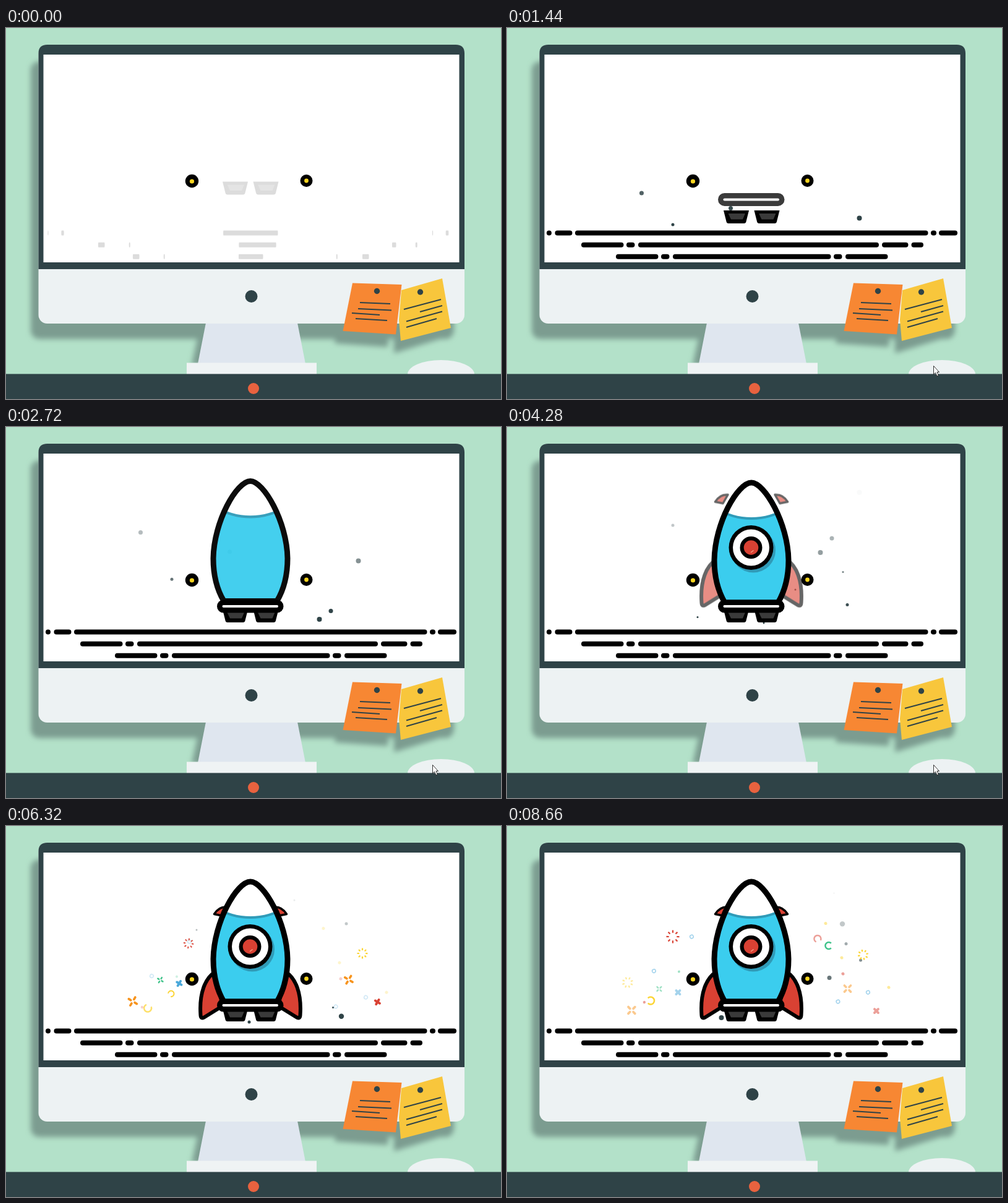
An HTML page that plays this animation: 800x600 px, repeating every 8680 ms.

```html
<!DOCTYPE html>
<html lang="en">
<head>
<meta charset="utf-8">
<title>Rocket assembly</title>
<style>
html, body { margin: 0; width: 100%; height: 100%; overflow: hidden; background: #b3e1c9; }
svg { display: block; width: 800px; height: 600px; }
</style>
</head>
<body>
<svg viewBox="0 0 800 600">
  <defs>
    <filter id="soft" x="-10%" y="-10%" width="120%" height="120%"><feGaussianBlur stdDeviation="4"/></filter>
    <path id="hull" d="M352 284C339 262 335 240 335 215C336 155 373 90 395 90C416 90 454 155 455 215C455 240 451 262 438 284Z"/>
    <clipPath id="inside"><use href="#hull"/></clipPath>
    <clipPath id="display"><rect x="60.5" y="43" width="672" height="336"/></clipPath>
    <g id="boot">
      <path d="M350 295H391L386.500 313Q386 316 383 316H358Q355 316 354.500 313Z"/>
      <path d="M357.500 300H385L381 309.500H362Z" fill="#3a3a3a"/>
    </g>
    <g id="fin" fill="#d94133" stroke="#000" stroke-linejoin="round">
      <path stroke-width="6" d="M338 236C322 246 312 270 314.500 306Q315 313 321 309L350 291Z"/>
      <path stroke-width="3.500" d="M357 131Q344 130 336.500 142.500L349 145Z"/>
    </g>
  </defs>

  <rect width="800" height="600" fill="#b3e1c9"/>

  <g fill="#7b9c90" filter="url(#soft)">
    <rect x="40" y="54" width="684" height="449" rx="14"/>
    <path d="M312 490L300 545H330V490Z"/>
    <path d="M544 433L624 436L617 516L531 510Z"/>
    <path d="M626 444L692 425L708 501L627 526Z"/>
  </g>
  <path d="M323 477H471L484 543H310Z" fill="#dfe6ef"/>
  <rect x="292" y="541.500" width="210" height="19" fill="#eff3f4"/>
  <rect x="52.500" y="27" width="688.500" height="451" rx="14" fill="#edf2f3"/>
  <path d="M52.500 390V41Q52.500 27 66.500 27H727Q741 27 741 41V390Z" fill="#2f4347"/>
  <rect x="60.500" y="43" width="672" height="336" fill="#fff"/>
  <circle cx="396.500" cy="434" r="10" fill="#2f4347"/>
  <ellipse cx="703" cy="560" rx="54" ry="23" fill="#edf2f3"/>
  <rect y="559.500" width="800" height="41" fill="#2f4347"/>
  <circle cx="400" cy="583" r="9" fill="#e8623f"/>

  <path d="M560 412.500L639.500 415L630 495.500L544.500 490Z" fill="#f78733"/>
  <path d="M639 424L705 405L719 485L638 506L635 472Z" fill="#f8c63c"/>
  <g fill="#2f4347"><circle cx="599.500" cy="425.500" r="4.700"/><circle cx="669.500" cy="427" r="4.700"/></g>
  <path stroke="#2f4347" stroke-width="2" d="M572 444L621 446M569 454L623 456.500M559 461L604 464M565 470L616 473M643 455L703 439M669 459L705 449M647 474.500L705 458.500M647 484L696 470"/>

  <g clip-path="url(#display)">
    <g id="lines"></g>
    <g id="bubbles" fill="#2f4347"></g>
    <g id="confetti"></g>
    <g id="fins">
      <use href="#fin"/><use href="#fin" transform="matrix(-1 0 0 1 790 0)"/>
    </g>
    <g id="boots">
      <use href="#boot"/><use href="#boot" x="49.500"/>
    </g>
    <g id="body">
      <use href="#hull" fill="#fff"/>
      <path clip-path="url(#inside)" d="M330 128Q395 168 460 128V281H330Z" fill="#3bcdee" stroke="none"/>
      <path clip-path="url(#inside)" d="M330 128Q395 168 460 128" fill="none" stroke="#309bb8" stroke-width="4"/>
      <use href="#hull" fill="none" stroke="#000" stroke-width="9"/>
    </g>
    <g id="porthole">
      <circle cx="398" cy="199.500" r="36" fill="#309bb8"/>
      <circle cx="394.500" cy="195" r="36"/>
      <circle cx="394.500" cy="195" r="29.500" fill="#fff"/>
      <circle cx="394.500" cy="195" r="18"/>
      <circle cx="394.500" cy="195" r="11.800" fill="#d94133"/>
      <path d="M394 203L398.500 199.500" stroke="#f2a184" stroke-width="1.500"/>
    </g>
    <g id="belt">
      <rect x="341" y="279.500" width="107.500" height="21" rx="10.500"/>
      <rect x="349.500" y="288" width="90.500" height="4" rx="2" fill="#fff"/>
    </g>
    <circle cx="300.500" cy="247.500" r="10.700"/><circle cx="300.500" cy="248" r="3.600" fill="#ffd61f"/>
    <circle cx="485.500" cy="247" r="10"/><circle cx="485.500" cy="247" r="3.400" fill="#ffd61f"/>
  </g>
  <path id="cursor" d="M689.500 546.500V560L692.500 557.500L695 563L697.300 562L695 556.500H698.500Z" fill="#fff" stroke="#222" stroke-width=".9"/>
</svg>
<script>
const LOOP = 8680;
const $ = id => document.getElementById(id);
const clamp = v => Math.max(0, Math.min(1, v));

function add(parent, tag, attrs) {
  const el = document.createElementNS('http://www.w3.org/2000/svg', tag);
  for (const k in attrs) el.setAttribute(k, attrs[k]);
  return parent.appendChild(el);
}
function place(el, transform, opacity) {
  el.setAttribute('transform', transform);
  el.setAttribute('opacity', opacity);
}

// Ground lines: y, then the ends of each dash
const dashes = [
  [331.5, 64, 72, 77.5, 105.5, 110, 680.5, 685, 694, 698, 728],
  [350.7, 120, 188.5, 193, 206.5, 212, 601, 606, 648.5, 653.5, 673],
  [369.8, 176, 244.5, 249, 262.5, 268, 523.5, 528, 541.5, 547, 615.5]
].flatMap(([y, ...ends]) => [0, 2, 4, 6, 8].map(i => {
  const w = ends[i + 1] - ends[i];
  const el = add($('lines'), 'rect', { x: -w / 2, y: -4, width: w, height: 8, rx: 4 });
  return { el, y, x: ends[i] + w / 2 };
}));

// Rising bubbles: x, radius, start time, speed, slowdown
const bubbles = [
  [217.5, 3.5, 764, 75.4], [361.5, 3.5, 1061, 70], [569.5, 4, 1292, 71], [268, 2.5, 1440, 56],
  [525, 3.5, 2448, 75.3], [506.5, 4, 2619, 69.2], [543, 1.5, 3087, 70], [466, 1.5, 3494, 70],
  [550, 2.5, 3800, 63.5], [308, 1.5, 4127, 68.4], [415, 1.5, 4266, 60], [528.5, 1.5, 6010, 79],
  [542, 4.2, 6195, 82, 7], [393, 2.5, 6306, 70], [548, 2.5, 7066, 80], [571.5, 2.5, 7348, 77],
  [521, 3.5, 7527, 64], [382, 2.5, 7646, 70], [346.5, 4, 8546, 70]
].map(([x, r, start, speed, drag = 0]) =>
  ({ el: add($('bubbles'), 'circle', { r }), x, start, speed, drag }));

const rays = (n, from, to) => Array.from({ length: n }, (_, i) => {
  const c = Math.cos(i * 2 * Math.PI / n), s = Math.sin(i * 2 * Math.PI / n);
  return `M${c * from} ${s * from}L${c * to} ${s * to}`;
}).join('');

const shapes = {
  dot: (s, c) => ['circle', { r: s, fill: c }],
  ring: (s, c) => ['circle', { r: s, fill: 'none', stroke: c, 'stroke-width': 1.6 }],
  arc: (s, c) => ['path', { d: `M${s * .7} ${s * .7}A${s} ${s} 0 1 1 ${s * .7} ${-s * .7}`,
    fill: 'none', stroke: c, 'stroke-width': 2.5 }],
  burst: (s, c) => ['path', { d: rays(8, s * .6, s), stroke: c, 'stroke-width': 2.2 }],
  flower: (s, c) => ['path', { d: rays(4, s * .4, s * .8), stroke: c,
    'stroke-width': s * .4, 'stroke-linecap': 'round' }],
  cross: (s, c) => ['path', { d: rays(4, s * .3, s * .65), stroke: c,
    'stroke-width': s * .6, 'stroke-linecap': 'round' }]
};
const red = '#d94133', yellow = '#fcd535', blue = '#4aa8da', green = '#3fc38a', orange = '#f7941e';

// Confetti by burst times: shape, x, y, size, colour, angle
const confetti = [
  [[4620, 7260], [
    ['ring', 303, 160, 2.8, blue], ['ring', 242, 215.5, 2.8, blue],
    ['ring', 588, 250, 2.8, blue], ['ring', 539.5, 265, 2.8, blue],
    ['dot', 282.5, 216.5, 2, green], ['dot', 226.5, 266, 2.2, red], ['dot', 547.5, 220, 2.5, red],
    ['dot', 519.5, 138.5, 2.5, yellow], ['dot', 545.5, 194, 2.5, yellow], ['dot', 621.5, 242, 2.5, yellow]]],
  [[5570, 7260], [
    ['flower', 250.5, 244.5, 6, green, 65], ['cross', 281, 250, 6.5, blue, 65],
    ['flower', 206, 279, 9.5, orange, 65], ['flower', 555, 244, 9, orange, 65],
    ['cross', 601.5, 280, 6.5, red, 65]]],
  [[7260], [['burst', 199.5, 234, 9, yellow], ['arc', 506.5, 163.5, 5.5, red, 270]]],
  [[5210, 6160, 8260], [['arc', 232, 282.5, 6, yellow, 180]]],
  [[5920, 8060], [['burst', 576, 206, 8.5, yellow]]],
  [[6160, 8260], [['burst', 268, 179, 10.5, red]]],
  [[8260], [['arc', 520, 193.5, 5.5, green]]]
].flatMap(([starts, items]) => starts.flatMap(start =>
  items.map(([kind, x, y, size, color, angle = 0]) =>
    ({ el: add($('confetti'), ...shapes[kind](size, color)), x, y, angle, start }))));

// Parts drop into place while fading in
const parts = { boots: -81, belt: 981, body: 2150, porthole: 2950, fins: 3920 };

function draw(t) {
  const grow = clamp((t + 92) / 600);
  for (const d of dashes) place(d.el, `translate(${d.x} ${d.y}) scale(${grow} 1)`, clamp((t + 81) / 600));

  for (const id in parts) {
    const p = clamp((t - parts[id]) / 600);
    place($(id), `translate(0 ${-54 * (1 - p)})`, p);
  }

  for (const b of bubbles) {
    const s = (t - b.start) / 1000;
    const y = 318 - b.speed * s + b.drag * s * s;
    place(b.el, `translate(${b.x} ${y})`, s < 0 ? 0 : clamp((y - 100) / 200));
  }

  for (const c of confetti) {
    const age = t - c.start, s = (age - 400) / 1000;
    const out = 1 - (1 - clamp(age / 400)) ** 3;
    const fall = 19 * Math.max(0, s) ** 1.35;
    const x = 395 + (c.x - 395) * out - .24 * fall;
    const y = 230 + (c.y - 230) * out + fall;
    place(c.el, `translate(${x} ${y}) rotate(${c.angle + 160 * s}) scale(${out})`,
      age < 0 ? 0 : clamp((2000 - age) / 1200));
  }

  const away = t < 2000 ? 1 - clamp((t - 500) / 400) : clamp((t - 5380) / 500);
  place($('cursor'), `translate(0 ${56 * away})`, away < 1 ? 1 : 0);
}

(function frame() {
  draw(performance.now() % LOOP);
  requestAnimationFrame(frame);
})();
</script>
</body>
</html>
```
